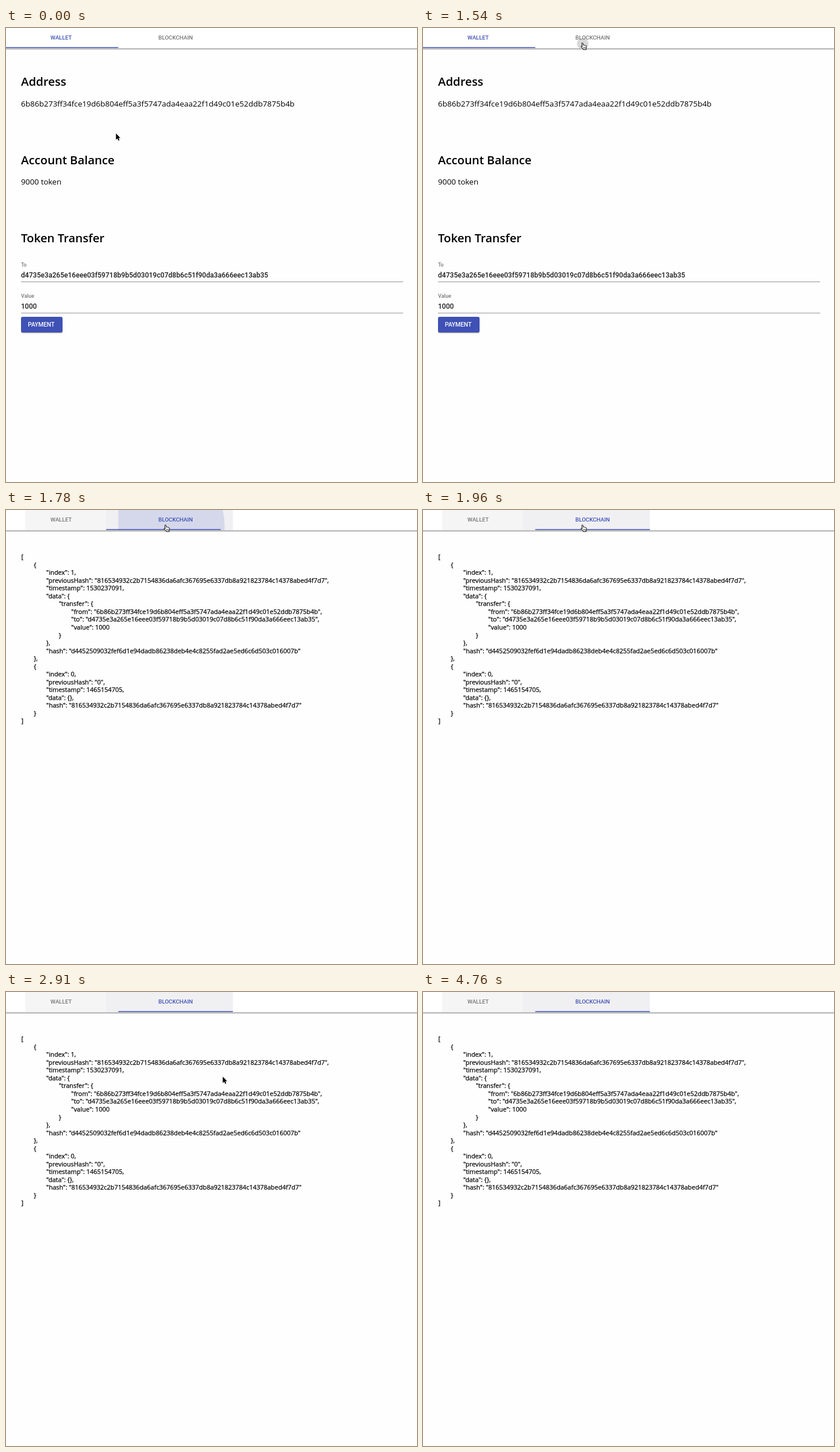
An HTML page that plays this animation: 712x786 px, repeating every 4.86 s.

```html
<!DOCTYPE html>
<html lang="en">
<head>
<meta charset="utf-8">
<title>Token wallet</title>
<style>
  html, body { margin: 0; width: 100%; height: 100%; overflow: hidden; background: #fefefe; }
  svg { display: block; }
  text { white-space: pre; }
  .body { font: 13.5px "Open Sans", "Noto Sans", sans-serif; }
  .head { font: 600 20.3px "Open Sans", "Noto Sans", sans-serif; }
  .json { font: 10.95px "Open Sans", "Noto Sans", sans-serif; stroke: #000; stroke-width: .25; }
  .tab { font: 500 9.75px Roboto, sans-serif; }
  .label { font: 500 9.1px Roboto, sans-serif; fill: #757575; }
  .input { font: 500 12.08px Roboto, sans-serif; fill: #1c1c1c; }
  .button { font: 500 10.25px Roboto, sans-serif; fill: #fff; }
</style>
</head>
<body>
<svg width="712" height="786" viewBox="0 0 712 786">
  <clipPath id="tabClip"><rect x="194.5" width="198.5" height="35"/></clipPath>
  <rect width="712" height="35" fill="#fff"/>
  <g id="shade">
    <rect x="33" width="140" height="35" fill="#f5f5f5"/>
    <rect x="173" width="220" height="35" fill="#f0f0f3"/>
  </g>
  <circle id="ripple" cx="276.7" cy="27" clip-path="url(#tabClip)"/>
  <rect y="35" width="712" height="2" fill="#b8b8b8"/>
  <rect y="37" width="712" height="1" fill="#e6e6e6"/>
  <rect id="bar" y="33" height="1.5" width="198.5" fill="#3f51b5"/>
  <text id="walletTab" class="tab" x="77" y="20.3">WALLET</text>
  <text id="chainTab" class="tab" x="264" y="20.3">BLOCKCHAIN</text>

  <g id="wallet">
    <text class="head" x="26" y="100.3">Address</text>
    <text class="body" id="address" x="26" y="135.5"></text>
    <text class="head" x="26" y="235.8">Account Balance</text>
    <text class="body" x="26" y="271">9000 token</text>
    <text class="head" x="26" y="371.3">Token Transfer</text>
    <text class="label" x="26" y="412.6">To</text>
    <text class="input" id="payee" x="26" y="431.8"></text>
    <text class="label" x="26" y="466.8">Value</text>
    <text class="input" x="26" y="486">1000</text>
    <path d="M26 439.5H688M26 493.5H688" stroke="#949494"/>
    <rect x="26" y="502" width="72" height="27" rx="3" fill="#000" opacity=".12"/>
    <rect x="26" y="501" width="72" height="27" rx="3" fill="#000" opacity=".25"/>
    <rect x="26" y="500" width="72" height="27" rx="3" fill="#3f51b5"/>
    <text class="button" x="38" y="517.4">PAYMENT</text>
  </g>
  <g id="chain"></g>

  <g id="cursor">
    <path id="arrow" d="M.5 .5V11.4L3 9.2L4.8 13L6.6 12.2L4.9 8.5H8.2Z" stroke="#fff" stroke-width=".8" paint-order="stroke"/>
    <g id="hand" stroke="#000" stroke-linejoin="round" stroke-linecap="round">
      <path d="M2.9 7.2L2.1 2.2Q2 .8 3 .8T4.3 2L4.8 4.7Q5.8 4 6.5 4.9Q7.5 4.3 8.2 5.2Q9.4 4.8 10 6.2Q10.7 8.2 9.7 10V12.4H4.6L4 10.8L.8 7.9Q.3 6.6 1.5 6.5Z" fill="#fff"/>
      <path d="M5.1 8V10.5M6.7 8V10.5M8.3 8V10.5" stroke-width=".6"/>
    </g>
  </g>
</svg>
<script>
const LOOP = 4860, BEAT = 118, BLUE = '#3f51b5', GREY = '#757575';
const PRESS = 1430, OPEN = 1660, LEAVE = 2200;

const $ = id => document.getElementById(id);
const set = (id, attrs) => Object.entries(attrs).forEach(([k, v]) => $(id).setAttribute(k, v));
const show = (id, on) => set(id, { visibility: on ? 'visible' : 'hidden' });
// beats counted from a start time, the first one at once
const beats = (t, start) => Math.max(0, Math.floor((t - start) / BEAT) + 1);
const easeInOut = p => p < .5 ? 4 * p ** 3 : 1 - 4 * (1 - p) ** 3;

const from = '6b86b273ff34fce19d6b804eff5a3f5747ada4eaa22f1d49c01e52ddb7875b4b';
const to = 'd4735e3a265e16eee03f59718b9b5d03019c07d8b6c51f90da3a666eec13ab35';
const genesis = '816534932c2b7154836da6afc367695e6337db8a921823784c14378abed4f7d7';
const blocks = [
  { index: 1, previousHash: genesis, timestamp: 1530237091,
    data: { transfer: { from, to, value: 1000 } },
    hash: 'd4452509032fef6d1e94dadb86238deb4e4c8255fad2ae5ed6c6d503c016007b' },
  { index: 0, previousHash: '0', timestamp: 1465154705, data: {}, hash: genesis }
];

$('address').textContent = from;
$('payee').textContent = to;
JSON.stringify(blocks, null, '\t').split('\n').forEach((line, i) => {
  const text = document.createElementNS('http://www.w3.org/2000/svg', 'text');
  const code = line.trimStart();
  text.setAttribute('class', 'json');
  text.setAttribute('x', 26.6 + 21.6 * (line.length - code.length));
  text.setAttribute('y', 85.3 + 13.52 * i);
  text.textContent = code;
  $('chain').append(text);
});

// A straight move in equal steps, one per beat, then rest.
const line = (start, steps, x, y) => ({ start, path(t, [px, py]) {
  const p = Math.min(1, beats(t, start) / steps);
  return [px + (x - px) * p, py + (y - py) * p];
} });

// One turn clockwise around the listing.
const circle = start => ({ start, path(t) {
  const angle = (Math.min(5, beats(t, start)) * 82 - 154) * Math.PI / 180;
  return [276 + 130 * Math.cos(angle), 268 + 152 * Math.sin(angle)];
} });

const moves = [
  line(120, 1, 204, 192), line(680, 1, 226, 66),
  line(830, 1, 248, 34), line(950, 2, 273, 25),
  circle(LEAVE), line(2790, 2, 375, 146),
  line(3260, 2, 613, 588), line(3680, 1, 665, 722), line(3910, 4, 689, 800)
];
const pointer = t => moves.filter(m => m.start <= t).reduce((pos, m) => m.path(t, pos), [190, 182]);

function draw(now) {
  const t = now % LOOP;
  const [x, y] = pointer(t);
  const opened = t >= OPEN;
  const pointing = t >= 830 && t < LEAVE;
  const slide = easeInOut(Math.min(1, .35 * beats(t, OPEN)));
  const spread = beats(t, PRESS);

  set('cursor', { transform: `translate(${x} ${y})` });
  show('arrow', !pointing);
  show('hand', pointing);

  set('bar', { x: 194.5 * slide - (opened ? 0 : 4) });
  set('ripple', {
    r: Math.max(0, 46 * spread - 36),
    fill: opened ? BLUE : '#000',
    opacity: opened ? .3 / beats(t, OPEN) : .15
  });
  show('ripple', spread > 0 && t < 1960);
  show('shade', t >= OPEN + BEAT);

  set('walletTab', { fill: opened ? GREY : BLUE });
  set('chainTab', { fill: opened ? BLUE : GREY });
  show('wallet', !opened);
  show('chain', opened);
  requestAnimationFrame(draw);
}
draw(0);
</script>
</body>
</html>
```
